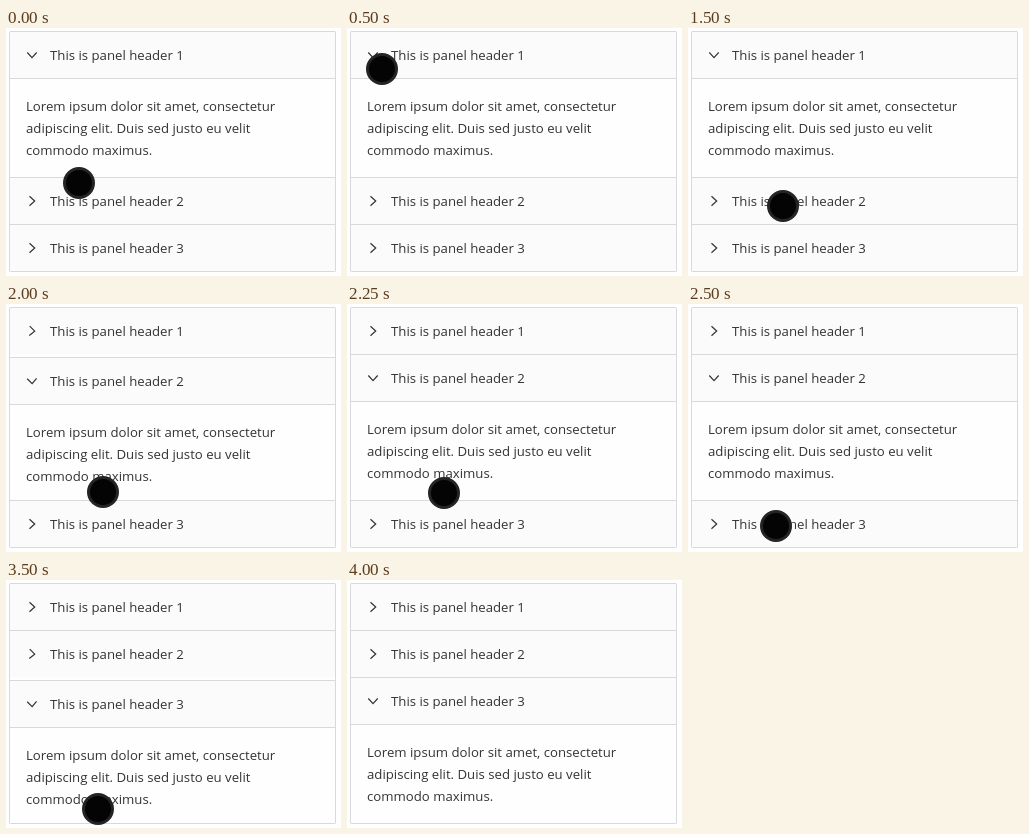
An HTML page that plays this animation: 335 px wide and 248 px high, repeating every 5000 ms.

```html
<!DOCTYPE html>
<html lang="en">
<head>
<meta charset="utf-8">
<title>Accordion</title>
<style>
html, body { margin: 0; width: 100%; height: 100%; overflow: hidden; background: #fff; }
body { position: relative; font: 13.2px/22px "Open Sans", sans-serif; color: #333; }
#list { position: absolute; left: 3px; top: 3px; width: 325px; border: solid #d9d9d9; border-width: 0 1px 1px; border-radius: 2px; }
.head { position: relative; height: 46px; padding-left: 40px; line-height: 46px; background: #fbfbfb; border-top: 1px solid #d9d9d9; }
.head svg { position: absolute; left: 16px; top: 17px; }
.body { overflow: hidden; background: #fefefe; }
.text { height: 66px; padding: 16px; border-top: 1px solid #d9d9d9; white-space: nowrap; }
.closing .text { border-color: transparent; }
path { fill: none; stroke: #333; stroke-width: 1.2; }
#cursor { position: absolute; left: -16px; top: -16px; width: 26px; height: 26px; border: 3px solid #242424; border-radius: 50%; background: #040404; }
</style>
</head>
<body>
<div id="list"></div>
<div id="cursor"></div>
<script>
const STEP = 250, LOOP = 5000, BODY = 99, NEARLY = 0.97;
const list = document.getElementById('list');
const cursor = document.getElementById('cursor');

// Pointer centre at each step; null while hidden.
const pointer = [
  [73, 155], [40, 72], [35, 41], [44, 37], null,
  [87, 172], [95, 178], [95, 178], [97, 188], [97, 189],
  [88, 222], [87, 228], [93, 231], [93, 231], [92, 229]
];
const opens = [0, 8, 14]; // step at which each panel opens

list.innerHTML = opens.map((_, i) => `
  <div>
    <div class="head">
      <svg width="12" height="12" viewBox="-6 -6 12 12"><path d="M-2.5 -4.7L2.7 0L-2.5 4.7"/></svg>
      This is panel header ${i + 1}
    </div>
    <div class="body"><div class="text">Lorem ipsum dolor sit amet, consectetur<br>adipiscing elit. Duis sed justo eu velit<br>commodo maximus.</div></div>
  </div>`).join('');

const panels = [...list.children].map(el => ({
  el, body: el.querySelector('.body'), arrow: el.querySelector('path')
}));

function openness(i, step) {
  const end = opens[i + 1] ?? Infinity;
  if (step < opens[i] || step > end) return 0;
  if (step === end) return 1 - NEARLY;
  return i > 0 && step === opens[i] ? NEARLY : 1;
}

function draw(now) {
  const step = Math.floor(now % LOOP / STEP);
  panels.forEach(({ el, body, arrow }, i) => {
    const open = openness(i, step);
    body.style.height = Math.round(BODY * open) + 'px';
    arrow.setAttribute('transform', `rotate(${90 * open})`);
    el.classList.toggle('closing', open < 0.5);
  });
  const at = pointer[step];
  cursor.hidden = !at;
  cursor.style.display = at ? 'block' : 'none';
  if (at) cursor.style.transform = `translate(${at[0]}px, ${at[1]}px)`;
}

const start = performance.now();
function tick() {
  draw(performance.now() - start);
  requestAnimationFrame(tick);
}
tick();
</script>
</body>
</html>
```
